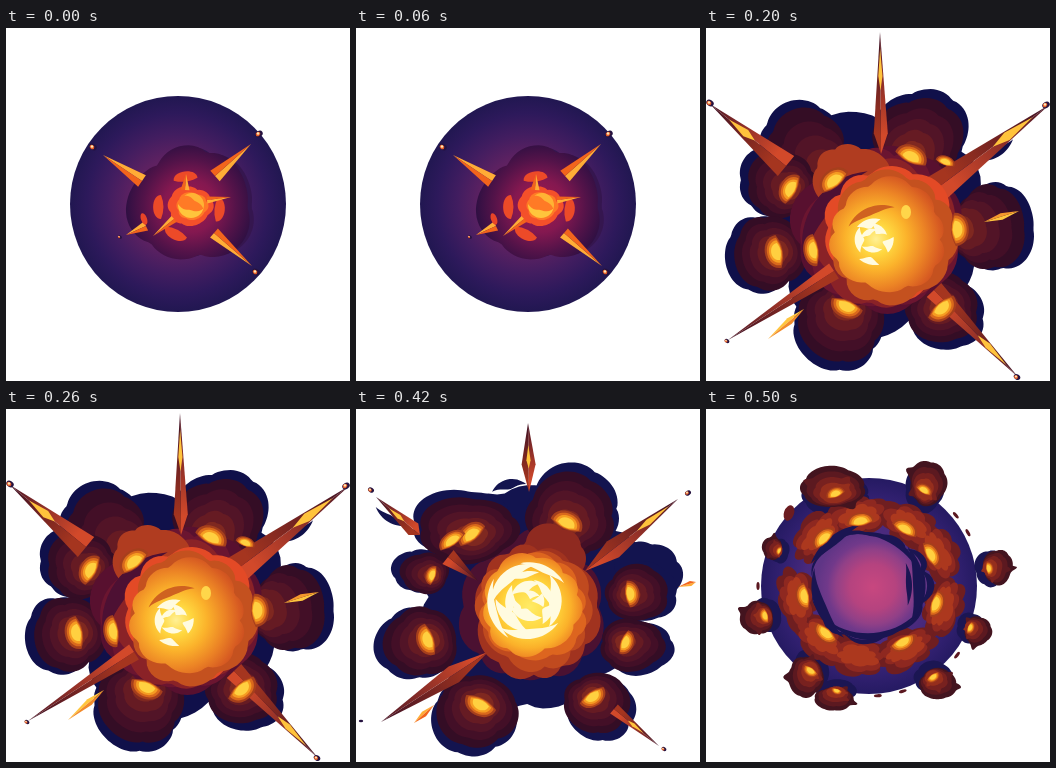
These frames come from a looping animation (344x353 px, 600 ms). An HTML page:

```html
<!DOCTYPE html>
<html lang="en">
<head>
<meta charset="utf-8">
<title>Explosion</title>
<style>
html, body { margin: 0; width: 100%; height: 100%; overflow: hidden; background: #fff; }
svg { display: block; width: 100vw; height: 100vh; }
.pose { visibility: hidden; animation: short 600ms step-end infinite; }
.pose.hold { animation-name: long; }
@keyframes short { 0% { visibility: visible; } 16.6666%, 100% { visibility: hidden; } }
@keyframes long { 0% { visibility: visible; } 33.3333%, 100% { visibility: hidden; } }
</style>
</head>
<body>
<svg viewBox="0 0 344 353"><defs></defs></svg>
<script>
const svg = document.querySelector('svg'), defs = svg.firstChild;
let layer = svg, paints = 0;

function add(tag, attrs, parent = layer) {
  const el = document.createElementNS('http://www.w3.org/2000/svg', tag);
  for (const k in attrs) el.setAttribute(k, attrs[k]);
  return parent.appendChild(el);
}
function pose(start, hold) {
  layer = add('g', { class: hold ? 'pose hold' : 'pose', style: `animation-delay:${start ? start - 600 : 0}ms` }, svg);
}
const rad = deg => deg * Math.PI / 180;
const noise = n => { const x = Math.sin(n * 127.1 + 3.7) * 43758.5; return x - Math.floor(x); };
const between = (a, b, n) => a + (b - a) * noise(n);

// Gradients; stops read "offset colour offset colour ..."
function paint(tag, box, stops) {
  const id = 'paint' + paints++, s = stops.split(' ');
  const g = add(tag, { id, gradientUnits: 'userSpaceOnUse', ...box }, defs);
  for (let i = 0; i < s.length; i += 2) add('stop', { offset: s[i] + '%', 'stop-color': s[i + 1] }, g);
  return `url(#${id})`;
}
const radial = (cx, cy, r, stops) => paint('radialGradient', { cx, cy, r }, stops);

const poly = (fill, pts) => add('polygon', { fill, points: pts.map(p => p.map(v => v.toFixed(1))).join(' ') });
const oval = (fill, cx, cy, rx, ry = rx, rot = 0) =>
  add('ellipse', { fill, cx, cy, rx, ry, transform: `rotate(${rot} ${cx} ${cy})` });

// Scalloped outline, turned by rot degrees; horn pulls out one pointed wisp
function cloud(fill, cx, cy, rx, ry, { lumps = 9, depth = .1, seed = 1, rot = 0, horn = 0 } = {}) {
  const pts = [], c = Math.cos(rad(rot)), s = Math.sin(rad(rot)), tip = 6.28 * noise(seed);
  for (let i = 0; i < 90; i++) {
    const a = i * Math.PI / 45;
    const bump = Math.abs(Math.sin(lumps * a / 2 + .6 * Math.sin(2 * a + seed) + seed)) ** .7;
    const k = 1 - depth + depth * bump + depth * .35 * Math.sin(3 * a + seed * 2)
      + horn * Math.exp(-(((a - tip) / .16) ** 2));
    const x = rx * k * Math.cos(a), y = ry * k * Math.sin(a);
    pts.push([cx + x * c - y * s, cy + x * s + y * c]);
  }
  poly(fill, pts);
}
// Shard from tip to base; bulge is where along its length it is widest
function shard(x0, y0, x1, y1, w, { bulge = 1, tones = ['#ffad36', '#f2641c'], hot } = {}) {
  const dx = x1 - x0, dy = y1 - y0, len = Math.hypot(dx, dy);
  const at = (t, s) => [x0 + dx * t + dy / len * s * w / 2, y0 + dy * t - dx / len * s * w / 2];
  tones.forEach((tone, i) => poly(tone, [at(0, 0), at(bulge, i ? -1 : 1), at(1, 0)]));
  if (hot) poly('#ffc33c', [at(hot, 0), at(hot + .22, .3), at(hot + .34, 0), at(hot + .22, -.3)]);
}
// Shard that cools from its base to its tip
function cooling(x0, y0, x1, y1, w, opts) {
  const fade = (a, b) => paint('linearGradient', { x1: x0, y1: y0, x2: x1, y2: y1 }, `0 ${a} 85 ${b}`);
  shard(x0, y0, x1, y1, w, { tones: [fade('#4d1626', '#d2492a'), fade('#3d1024', '#a5351f')], ...opts });
}
// Half-moon, its bulge pointing up before rotation
function moon(fill, x, y, l, t, rot = 0) {
  add('path', {
    fill, d: `M${-l} 0C${-l} ${-t * 1.5} ${l} ${-t * 1.5} ${l} 0Q0 ${t * .7} ${-l} 0Z`,
    transform: `translate(${x} ${y}) rotate(${rot})`
  });
}
const heat = ['#a63f1c', '#d9691c', '#f59c22', '#ffd040'];
const glow = (x, y, l, t, rot) => heat.forEach((c, i) => moon(c, x, y, l * (1.25 - i * .2), t * (1.3 - i * .2), rot));

// Tapered stroke along an arc, angles in degrees
function sweep(fill, cx, cy, r, from, to, w) {
  const out = [], back = [];
  for (let i = 0; i <= 16; i++) {
    const a = rad(from + (to - from) * i / 16), pt = q => [cx + q * Math.cos(a), cy + q * Math.sin(a)];
    out.push(pt(r));
    back.unshift(pt(r - w * Math.sin(Math.PI * i / 16)));
  }
  poly(fill, out.concat(back));
}
// Rings of random sweeps filling a disc from rim to middle
function whirl(fill, cx, cy, rim, middle, count, width, seed) {
  for (let i = 0; i < count; i++) {
    const from = i * 137.5 + seed * 40, r = rim + (middle - rim) * i / count;
    sweep(fill, cx + between(-2, 2, seed + i), cy + between(-2, 2, seed - i), r, from,
      from + between(50, 115, seed * 3 + i), width * between(.6, 1.2, seed * 5 + i));
  }
}
// Puffs are [x, y, rx, ry, pull]; pull moves the hot spot toward the heart
const soot = ['#340d25', '#430f27', '#521427', '#661b23', '#7f2820'];
const rust = ['#43141f', '#5c1920', '#78211f', '#952e1d'];

function shadows(fill, list, [hx, hy], shift) {
  list.forEach(([x, y, rx, ry], i) => {
    const d = Math.hypot(x - hx, y - hy);
    cloud(fill, x + (x - hx) / d * shift, y + (y - hy) / d * shift, rx * 1.04, ry * 1.04, { lumps: 5, depth: .08, seed: i });
  });
}
function puffs(list, [hx, hy], shades, opts) {
  list.forEach(([x, y, rx, ry, pull = .08], i) => shades.forEach((shade, j) => {
    const size = 1 - j * .17, k = pull * j / shades.length;
    cloud(shade, x + (hx - x) * k, y + (hy - y) * k, rx * size, ry * size, { lumps: 5, depth: .08, seed: i + j * .2, ...opts });
  }));
}
function glows(list, [hx, hy]) {
  list.forEach(([x, y, rx, ry, pull = .08]) => {
    const size = Math.min(rx, ry, 36), turn = Math.atan2(y - hy, x - hx) * 180 / Math.PI + 90;
    glow(x + (hx - x) * pull, y + (hy - y) * pull, size * .37, size * .26, turn);
  });
}
function ember(x, y, r = 4, rot = 35) {
  oval('#25123f', x, y, r, r * .75, rot);
  oval('#e8602a', x - 1, y, r * .6, r * .5, rot);
  oval('#ffe9b8', x - 1, y - .5, r * .3);
}

// Spark inside the night disc
pose(0);
oval(radial(172, 176, 108, '0 #85265f 45 #5c2161 65 #421d60 84 #2d195b 100 #211751'), 172, 176, 108);
cloud('#35164f', 190, 177, 63, 56, { lumps: 5, depth: .12, seed: 3 });
cloud(radial(184, 178, 66, '0 #a31a4c 40 #841850 70 #541349 100 #2b0f42'), 185, 177, 64, 58, { lumps: 5, depth: .12, seed: 3 });
shard(97, 127, 136, 153, 14);
shard(245, 116, 209, 148, 14);
shard(246, 238, 208, 205, 12);
shard(120, 207, 140, 198, 10);
for (const a of [-97, 5, 117, 180])
  moon('#ec4a28', 183 + 28 * Math.cos(rad(a)), 179 + 28 * Math.sin(rad(a)), 12, 7, a + 90);
oval('#e84428', 138, 191, 3, 6, -20);
cloud('#f4502a', 184, 178, 23, 20, { lumps: 6 });
cloud('#ff7a26', 186, 178, 16, 14, { lumps: 6 });
sweep('#ffc53c', 185, 177, 13, 15, 185, 8);
sweep('#ffb334', 186, 177, 12, 230, 380, 7);
shard(180, 146, 179, 162, 9);
shard(225, 169, 201, 172, 7);
shard(147, 208, 168, 191, 8);
ember(87, 119); ember(253, 106, 4, -35); ember(250, 244); ember(114, 209, 2);

// Burst
pose(100);
oval(radial(172, 176, 108, '0 #5d2060 60 #3f1c62 82 #2d195d 100 #211751'), 172, 176, 108);
cloud('#3c2161', 178, 182, 82, 78, { lumps: 7, depth: .14, horn: .2, seed: 9 });
cloud('#2a1249', 216, 150, 41, 60, { lumps: 6 });
sweep('#40235f', 212, 112, 27, 215, 350, 10);
sweep('#40235f', 254, 88, 25, 60, 160, 9);
sweep('#40235f', 86, 118, 30, -40, 40, 9);
cloud(radial(180, 182, 82, '0 #b72335 50 #8f1c3c 80 #671544 100 #491143'), 178, 184, 79, 74, { lumps: 9, depth: .12, seed: 2 });
['#a0203a', '#bb2d31', '#d43d2a', '#ee6426'].forEach((c, i) =>
  cloud(c, 178 + i * .8, 183 - i, 65 - i * 11, 63 - i * 10, { lumps: 9 - i, depth: .13, seed: 2 + i }));
for (let i = 0; i < 8; i++) {
  const a = i * 45 + 20, r = i % 2 ? 58 : 43;
  moon(i % 2 ? '#c4302f' : '#f0762a', 178 + r * Math.cos(rad(a)), 183 + r * Math.sin(rad(a)), 10, 5, a + 90);
}
cloud(radial(180, 181, 30, '0 #ffe04c 35 #ffb62e 75 #f98d28 100 #ee6b26'), 180, 178, 27, 26, { lumps: 7 });
cloud('#ffe250', 181, 180, 12, 7, { lumps: 6, depth: .3 });
const blaze = ['#ffc83e', '#ee6a24'];
shard(181, 69, 181, 112, 7, { tones: ['#f48a2a', '#d64c24'] });
shard(182, 90, 183, 156, 6, { tones: ['#ffd84a', '#ffb534'] });
shard(92, 112, 136, 149, 7, { tones: blaze });
shard(273, 104, 233, 130, 9, { tones: blaze });
shard(240, 123, 206, 148, 6, { tones: blaze });
shard(248, 259, 202, 220, 9, { tones: blaze });
shard(100, 231, 141, 205, 7, { tones: blaze });
shard(138, 221, 163, 202, 7, { tones: blaze });
shard(247, 174, 206, 181, 6, { tones: blaze });
shard(158, 136, 165, 156, 7, { tones: blaze });
ember(72, 102); ember(285, 97, 3.5, -35); ember(257, 268, 3.5); ember(86, 248, 2.2);

// Full blast
pose(200);
const blast = [170, 205];
const billows = [
  [100, 118, 40, 38, .42], [75, 156, 35, 34, .12], [213, 112, 46, 43, .2], [283, 200, 38, 43, .3],
  [64, 225, 37, 38], [135, 292, 44, 43, .18], [236, 280, 37, 36, .02]
];
cloud('#10104a', 170, 195, 114, 114, { lumps: 9 });
shadows('#10104a', billows, blast, 8);
sweep('#10104a', 276, 100, 33, 20, 85, 7);
puffs(billows, blast, soot);
['#58102f', '#6b1530', '#8a2227'].forEach((c, i) =>
  cloud(c, 172 + i * 3, 200 + i * 2, 86 - i * 6, 84 - i * 4, { lumps: 9, seed: i + 2 }));
cooling(4, 76, 80, 138, 26, { hot: .25 });
cooling(343, 77, 226, 164, 30, { hot: .14 });
cooling(22, 312, 128, 243, 18);
cooling(312, 349, 228, 262, 20, { hot: .14 });
cooling(174, 4, 175, 126, 14, { bulge: .83, hot: .14 });
cloud('#b03c20', 146, 151, 41, 35, { lumps: 7, seed: 4 });
sweep('#4d1033', 168, 215, 72, 165, 265, 17);
cloud('#e34a26', 184, 204, 66, 68, { lumps: 9, seed: 5 });
cloud('#c4511f', 186, 210, 64, 68, { lumps: 10, seed: 7 });
cloud(radial(170, 211, 74, '0 #fff096 20 #ffd840 42 #fbb22b 66 #ec8425 86 #d85d22 100 #c6471f'),
  182, 208, 58, 58, { lumps: 10, seed: 6 });
sweep('#cf6220', 176, 214, 37, 205, 290, 8);
oval('#ffd64a', 200, 184, 5, 7);
whirl('#fffbe0', 168, 212, 24, 9, 7, 9, 2);
glows(billows, blast);
glow(109, 222, 13, 8, 262);
glow(239, 135, 8, 5, 20);
shard(313, 183, 278, 194, 7, { bulge: .5, tones: ['#ffc63e', '#f5982c'] });
shard(62, 311, 98, 281, 7, { bulge: .6, tones: ['#ffc63e', '#f28a2a'] });
ember(4, 75); ember(340, 77, 4, -35); ember(21, 313, 2.6); ember(311, 349, 3.5);

// Clouds part around the white-hot core
pose(300, true);
const heart = [174, 197];
const parted = [
  [214, 107, 45, 44, .1], [112, 121, 51, 34], [69, 164, 25, 21], [65, 233, 38, 35],
  [121, 302, 42, 37], [241, 294, 34, 31], [281, 184, 32, 29], [276, 236, 33, 27]
];
cloud('#13144f', 175, 188, 116, 114, { lumps: 11 });
cloud('#13144f', 291, 166, 35, 35, { lumps: 5 });
shadows('#13144f', parted, heart, 8);
sweep('#13144f', 156, 92, 22, 205, 310, 10);
sweep('#13144f', 47, 88, 29, 80, 160, 7);
cloud('#4b1131', 176, 198, 74, 76, { lumps: 10, seed: 3 });
puffs(parted, heart, soot);
cooling(20, 88, 64, 126, 15, { bulge: .85, hot: .3 });
cooling(122, 172, 92, 148, 18);
cooling(322, 90, 229, 162, 20, { bulge: .7, hot: .1 });
cooling(25, 313, 132, 243, 19, { bulge: .68 });
cooling(303, 337, 258, 300, 12, { hot: .35 });
cooling(172, 14, 173, 83, 14, { bulge: .6, hot: .32 });
cloud('#8f2a20', 196, 150, 33, 36, { lumps: 6 });
['#a1331f', '#c04a1f', '#dd651f'].forEach((c, i) =>
  cloud(c, 180 - i, 203 - i * 2, 64 - i * 5, 68 - i * 7, { lumps: 10, seed: 4 + i }));
cloud(radial(174, 198, 60, '0 #ffeb66 45 #ffd43a 68 #fbb12a 87 #ee8323 100 #d95f20'), 175, 196, 50, 52, { lumps: 9, seed: 7 });
whirl('#fffbe0', 173, 192, 42, 10, 15, 11, 3);
glows(parted, heart);
glow(97, 133, 12, 7, -35);
shard(340, 173, 322, 178, 5, { bulge: .3 });
shard(58, 314, 78, 296, 6, { bulge: .5 });
ember(15, 81, 3.2); ember(332, 84, 3.2, -35); ember(308, 340, 2.6);
oval('#25123f', 5, 312, 2.2, 1.2);

// Cooling ring
pose(500);
const ring = [164, 177];
const strays = [
  [127, 78, 33, 21], [222, 74, 19, 23], [66, 139, 10, 12], [51, 209, 17, 17], [100, 268, 18, 21],
  [128, 290, 20, 12], [232, 275, 19, 16], [272, 222, 14, 15], [292, 158, 15, 18]
];
oval(radial(163, 177, 108, '0 #5a3188 60 #48297c 80 #332172 100 #251a62'), 163, 177, 108);
shadows('#1b1653', strays, ring, -8);
const clumps = [-134, -99, -60, -28, 17, 62, 100, 132, 170];
['#6f1e20', '#8e2820', '#ac381e'].forEach((c, j) => clumps.forEach((a, i) =>
  cloud(c, 165 + 75 * Math.cos(rad(a)), 177 + 71 * Math.sin(rad(a)), 33 - j * 6, 21 - j * 5,
    { lumps: 7, depth: .2, seed: i + j, rot: a + 90 })));
cloud('#1a1552', 164, 177, 62, 57, { lumps: 9, depth: .12 });
cloud(radial(167, 178, 57, '0 #c8477f 40 #b5437f 65 #914087 80 #71398a 100 #5f3586'), 162, 177, 58, 53, { lumps: 9, depth: .06 });
whirl('#1a1552', 163, 177, 60, 52, 5, 9, 5);
sweep('#1a1552', 162, 177, 56, 315, 400, 11);
sweep('#1a1552', 160, 177, 46, 330, 385, 6);
clumps.filter(a => a !== 100).forEach(a =>
  glow(165 + 66 * Math.cos(rad(a)), 176 + 63 * Math.sin(rad(a)), 11, 7, a + 90));
puffs(strays, ring, rust, { horn: .3 });
glows(strays, ring);
oval('#6b1c20', 83, 104, 5, 8, 20);
for (const a of [-40, -29, 39, 73, 86, 180])
  oval('#5b1820', 164 + 112 * Math.cos(rad(a)), 177 + 110 * Math.sin(rad(a)), 4, 1.6, a + 90);
</script>
</body>
</html>
```
